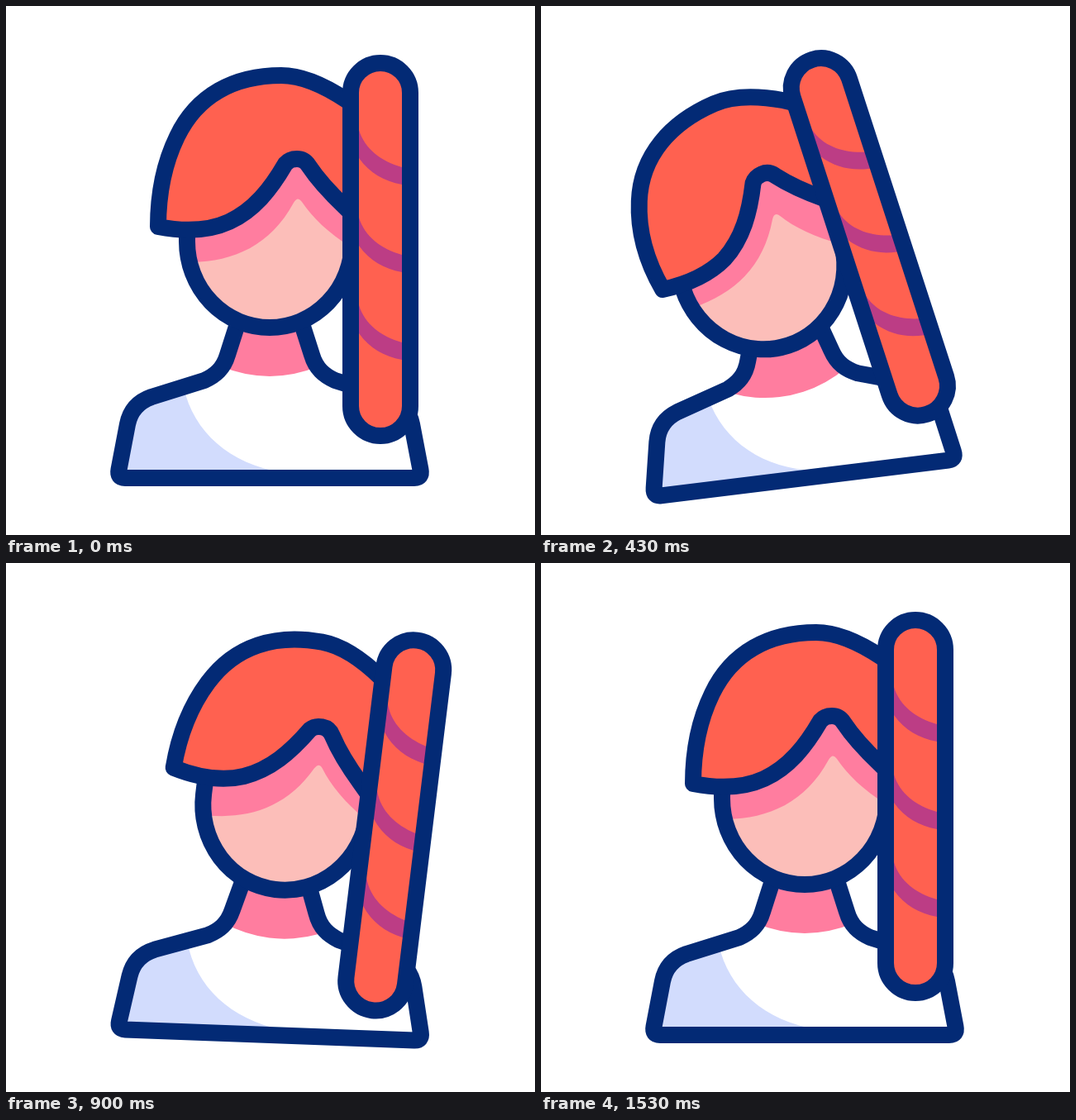
Recreate the animation shown at these times as an HTML page with a canvas. Size 640 by 640 pixels, loop 2000 ms.

```html
<!DOCTYPE html>
<html lang="en">
<head>
<meta charset="utf-8">
<title>Swaying portrait</title>
<style>
html, body { margin: 0; width: 100%; height: 100%; overflow: hidden; background: #fff; }
canvas { display: block; width: 100vw; height: 100vh; }
</style>
</head>
<body>
<canvas id="stage" width="640" height="640"></canvas>
<script>
const ctx = document.getElementById('stage').getContext('2d');
const NAVY = '#032a75', ORANGE = '#ff6150', PLUM = '#bc3d85';
const PINK = '#ff7d9f', SKIN = '#fcbeb9', SHADE = '#d2dcfd';
const LOOP = 2000, FRAME = 1000 / 30;

const KEYS = [0, 13, 23.25, 33.6, 46];
const BODY_TILT = [0, -7, 5, -4.5, 0];
const HEAD_TILT = [0, -11, 11.2, -10.2, 0];
const HAIR_TILT = [0, -5.5, 7.5, -5.2, 0];
const HAIR_PUFF = [0, 1, 0, 0.6, 0];
const HEAD_DIP = [0, 20.2, 0, 19.8, 0];

const body = new Path2D(
  'M284 372 L268 422 C263 439 253 447 240 453 L176 473 C159 479 150 491 147 506 ' +
  'L136.500 561 Q134.500 571 144 571 H494 Q503.500 571 501.500 561 ' +
  'L491 506 C488 491 479 479 462 473 L398 453 C385 447 375 439 370 422 L354 372');
const bodyShade = new Path2D('M100 450 L213 450 C221 508 262 548 322 562 L322 600 H100 Z');
const face = new Path2D('M219 285 A100 115 0 0 1 419 285 A100 104 0 0 1 219 285 Z');
const faceLight = new Path2D(
  'M225 310 C275 309 320 290 348 238 Q353 229.500 358 237 ' +
  'C370 255 390 275 418 292 A100 104 0 0 1 219 285 Z');
const faceLine = new Path2D('M219 242 V285 A100 104 0 0 0 419 285 V242');
const stripe = new Path2D(
  'M420 129 L427 150 C434 173 454 188 479 195 L487 197 V217 L479 216 C457 212 440 202 427 184 L420 174 Z');
const braid = new Path2D();
braid.roundRect(417, 69, 72, 451, 36);

// The back of the hair swells outwards with puff while its tip tucks in.
function hairPath(puff) {
  const x = 4 * puff, y = 2 * puff;
  const tipX = 184 + 2.4 * puff, tipY = 267 - 1.7 * puff;
  const path = new Path2D();
  path.moveTo(tipX, tipY);
  path.bezierCurveTo(184 - x / 3, 235 - y, 189 - x, 195 - y, 207 - x, 158 - y);
  path.bezierCurveTo(231 - x, 108 - y, 276, 84, 333, 84);
  path.bezierCurveTo(360, 84, 388, 98, 412, 114);
  path.lineTo(440, 135);
  path.lineTo(440, 272);
  path.lineTo(410, 243);
  path.bezierCurveTo(393, 227, 378, 211, 366, 193);
  path.quadraticCurveTo(361, 185, 352, 185);
  path.quadraticCurveTo(343, 185, 338, 191);
  path.bezierCurveTo(320, 222, 300, 247, 270, 261);
  path.quadraticCurveTo(235, 277 - y, tipX, tipY);
  path.closePath();
  return path;
}

// Eased value between the two keys around the given frame.
function pose(values, frame) {
  if (frame >= KEYS[KEYS.length - 1]) return values[values.length - 1];
  const i = KEYS.findIndex(key => key > frame) - 1;
  const u = (frame - KEYS[i]) / (KEYS[i + 1] - KEYS[i]);
  return values[i] + (values[i + 1] - values[i]) * u * u * (3 - 2 * u);
}

function rotateAt(x, y, degrees) {
  ctx.translate(x, y);
  ctx.rotate(degrees * Math.PI / 180);
  ctx.translate(-x, -y);
}

function fill(path, color) {
  ctx.fillStyle = color;
  ctx.fill(path);
}

function group(draw) {
  ctx.save();
  draw();
  ctx.restore();
}

function drawScene(frame) {
  const enterHead = () => {
    ctx.translate(0, pose(HEAD_DIP, frame));
    rotateAt(320, 390, pose(HEAD_TILT, frame));
  };

  ctx.fillStyle = '#fff';
  ctx.fillRect(0, 0, 640, 640);
  ctx.strokeStyle = NAVY;
  ctx.lineWidth = 20;
  ctx.lineJoin = 'round';

  group(() => {
    rotateAt(319, 571, pose(BODY_TILT, frame));

    group(() => {
      ctx.clip(body);
      fill(bodyShade, SHADE);
      // The head's shadow follows the head but stays on the body.
      enterHead();
      ctx.fillStyle = PINK;
      ctx.beginPath();
      ctx.arc(319, 298, 150, 0, Math.PI * 2);
      ctx.fill();
    });
    ctx.stroke(body);

    enterHead();
    fill(face, PINK);
    fill(faceLight, SKIN);
    ctx.stroke(faceLine);

    group(() => {
      const hair = hairPath(pose(HAIR_PUFF, frame));
      rotateAt(320, 178, pose(HAIR_TILT, frame));
      fill(hair, ORANGE);
      ctx.stroke(hair);
    });

    fill(braid, ORANGE);
    for (let i = 0; i < 3; i++) {
      group(() => {
        ctx.translate(0, i * 106);
        fill(stripe, PLUM);
      });
    }
    ctx.stroke(braid);
  });
}

const start = performance.now();
function tick() {
  const time = (performance.now() - start) % LOOP;
  drawScene(Math.floor((time + 5) / FRAME));
  requestAnimationFrame(tick);
}
tick();
</script>
</body>
</html>
```
